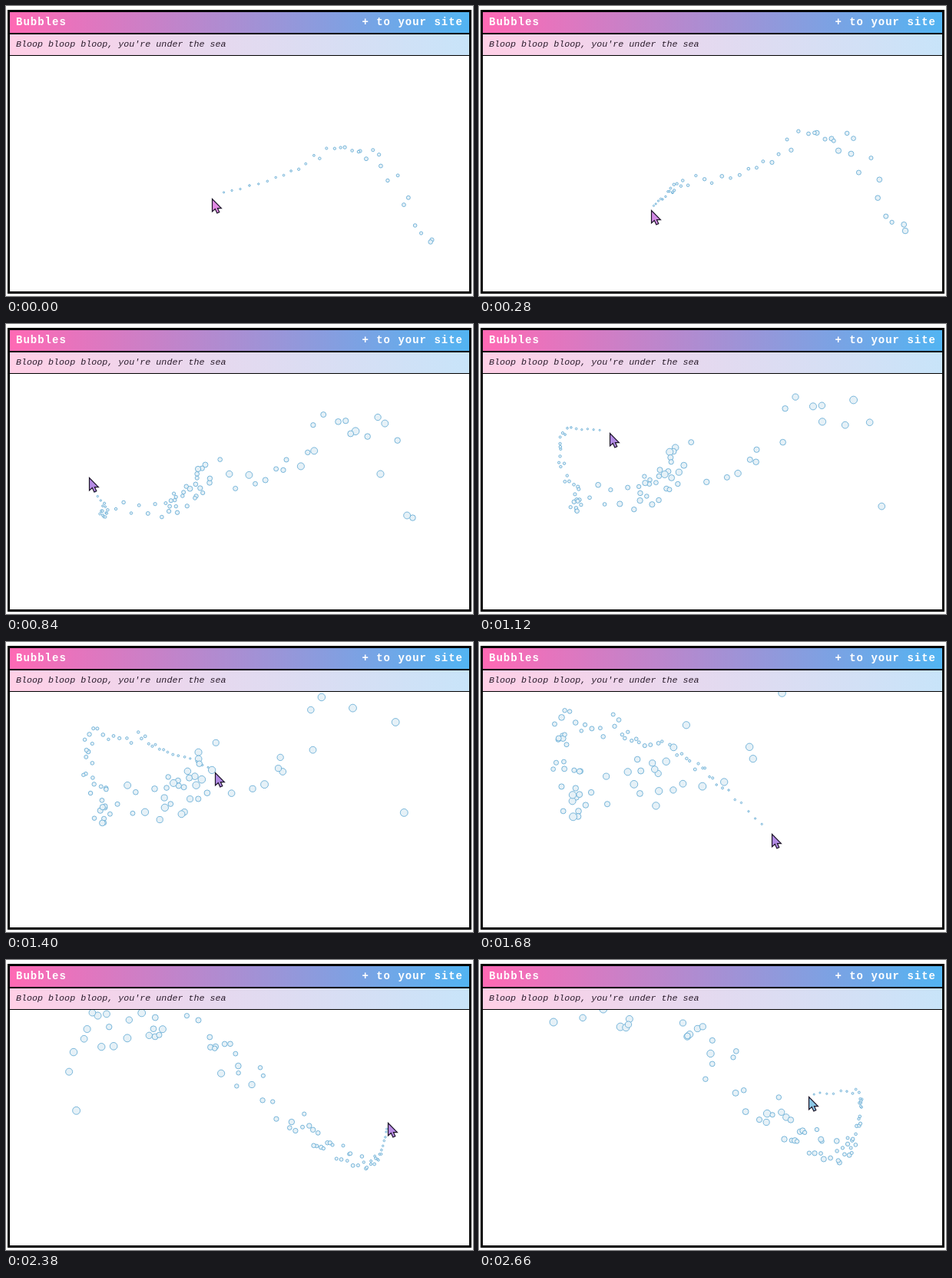
These frames come from a looping animation (608 px wide and 378 px high, 2730 ms). An HTML page with a canvas:

```html
<!DOCTYPE html>
<html lang="en">
<head>
<meta charset="utf-8">
<title>Bubbles</title>
<style>
  html, body { margin: 0; width: 100%; height: 100%; overflow: hidden; background: #fff; }
  .window { position: absolute; left: 2px; top: 5px; width: 598px; height: 364px; border: 3px solid #000; }
  .bar, .note { font-family: "Liberation Mono", "DejaVu Sans Mono", monospace; white-space: pre; padding: 0 8px; }
  .bar {
    display: flex; justify-content: space-between; height: 27px; line-height: 27px;
    border-bottom: 2px solid #000; color: #fff; font-size: 14px; font-weight: bold; letter-spacing: 1px;
    background: linear-gradient(90deg, #ff69b4, #52b4f2);
  }
  .note {
    height: 27px; line-height: 27px; border-bottom: 1px solid #000; color: #2a1c2c;
    font-size: 11.7px; font-style: italic;
    background: linear-gradient(90deg, #ffcfe6, #c8e4f9);
  }
  canvas { position: absolute; left: 0; top: 57px; width: 598px; height: 307px; }
</style>
</head>
<body>
<div class="window">
  <div class="bar"><span>Bubbles</span><span>+ to your site</span></div>
  <div class="note">Bloop bloop bloop, you're under the sea</div>
  <canvas width="598" height="307"></canvas>
</div>
<script>
const LOOP = 2730, STEP = 70, TICK = 1000 / 60, GAP = 17;
const ctx = document.querySelector('canvas').getContext('2d');

// Pointer positions, one every KEY ms; the first ones lie before the loop starts
const KEY = 140, LEAD = -560, END = 2660;
const path = [
  [556, 346], [490, 232], [432, 206], [355, 230], [268, 251], [248, 252],
  [224, 266], [206, 268], [129, 257], [131, 254], [108, 200], [114, 150],
  [170, 142], [212, 152], [272, 170], [314, 195], [381, 250], [411, 263],
  [445, 278], [473, 281], [488, 262], [497, 212], [491, 182], [429, 178]
];

// Catmull-Rom curve through the path
function pointer(t) {
  const s = (t - LEAD) / KEY;
  const i = Math.min(path.length - 2, Math.floor(s)), u = s - i;
  const at = k => path[Math.max(0, Math.min(path.length - 1, k))];
  const [a, b, c, d] = [-1, 0, 1, 2].map(k => at(i + k));
  return [0, 1].map(n => b[n] + u / 2 * (c[n] - a[n] +
    u * (2 * a[n] - 5 * b[n] + 4 * c[n] - d[n] + u * (3 * (b[n] - c[n]) + d[n] - a[n]))));
}

const lerp = (a, b, u) => a + (b - a) * Math.max(0, Math.min(1, u));

// Pink drifts to violet, then turns blue at the end
function tint(t) {
  const hue = t < 2380 ? lerp(298, 266, t / 900) : lerp(270, 200, (t - 2380) / 280);
  return `hsl(${hue} 62% 72%)`;
}

let seed = 20;
function random() {
  seed = seed + 0x6D2B79F5 | 0;
  let n = Math.imul(seed ^ seed >>> 15, 1 | seed);
  n = n + Math.imul(n ^ n >>> 7, 61 | n) ^ n;
  return ((n ^ n >>> 14) >>> 0) / 4294967296;
}
const spread = size => (random() - 0.5) * size;

const bubbles = [];
for (let born = LEAD; born < END; born += GAP) {
  const [x, y] = pointer(born);
  bubbles.push({
    x, y, born,
    rise: 0.4 + random(),
    life: 60 + 60 * random(),
    drift: spread(0.2),
    bend: spread(0.004)
  });
}

function drawBubble(b, t) {
  const age = (t - b.born) / TICK;
  if (age < 1.2 || age > b.life) return;
  const scale = 0.2 + age / b.life;
  const x = b.x + b.drift * age + b.bend * age * age - 2 * scale;
  const y = b.y - b.rise * age - age * age / 2400 - 2;
  ctx.beginPath();
  ctx.arc(x, y, 4 * scale + 0.2, 0, 2 * Math.PI);
  ctx.fill();
  ctx.stroke();
}

const arrow = new Path2D('M.5 .5V17L4.3 13.6L6.8 19L9.8 17.6L7.4 12.6H12.4Z');

function draw(t) {
  ctx.setTransform(1, 0, 0, 1, -5, -65);
  ctx.clearRect(5, 65, 598, 307);
  ctx.fillStyle = '#e6f1f7';
  ctx.strokeStyle = '#5ba6d2';
  ctx.lineWidth = 0.8;
  bubbles.forEach(b => drawBubble(b, t));
  ctx.translate(...pointer(t).map(Math.round));
  ctx.fillStyle = tint(t);
  ctx.strokeStyle = '#1c1428';
  ctx.lineWidth = 1.2;
  ctx.fill(arrow);
  ctx.stroke(arrow);
}

const start = performance.now();
function tick() {
  const t = (performance.now() - start) % LOOP;
  draw(Math.floor(t / STEP) * STEP);
  requestAnimationFrame(tick);
}
tick();
</script>
</body>
</html>
```
